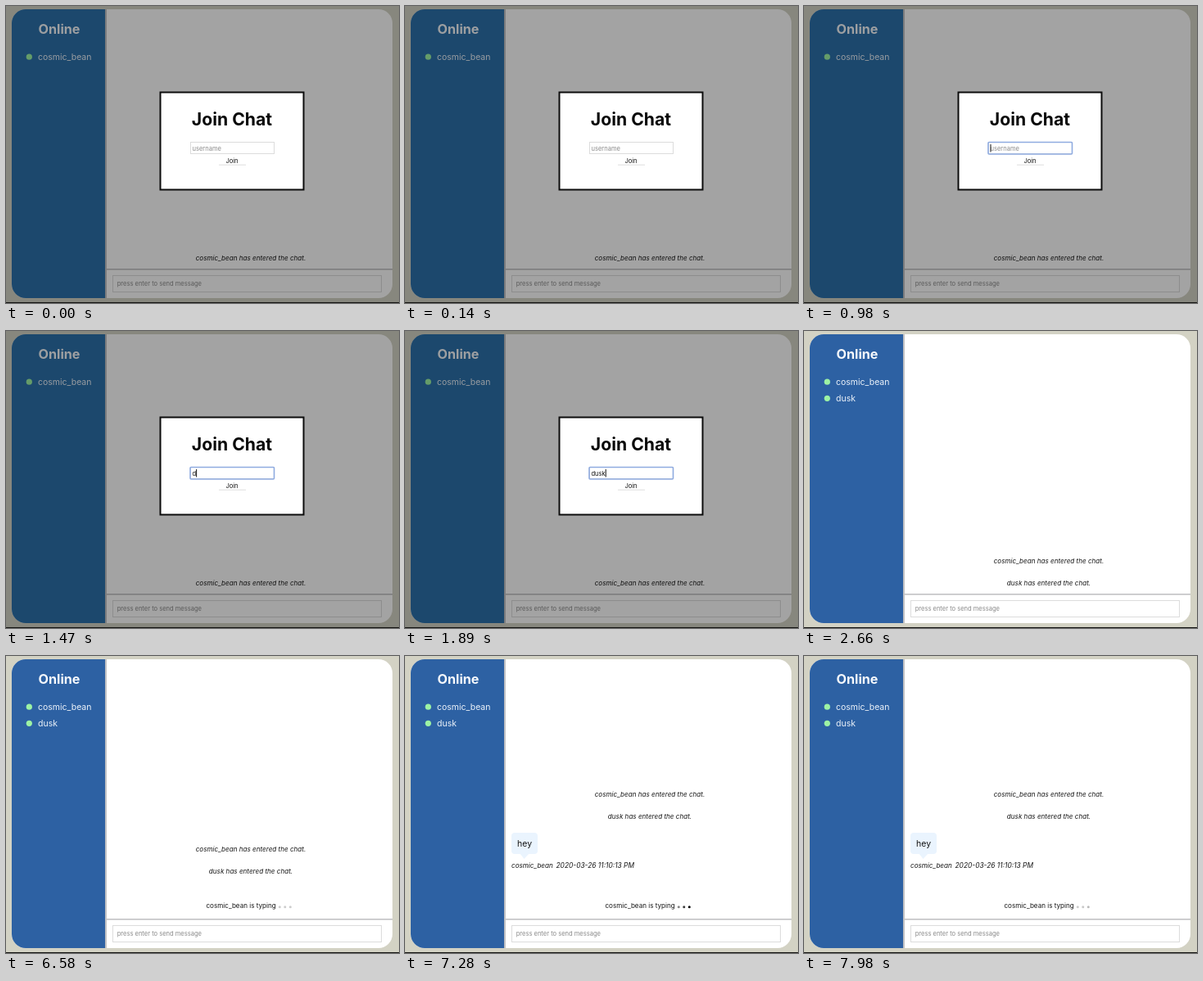
Animation of 480x363 px, one loop 8000 ms. Source, as an HTML page:

```html
<!DOCTYPE html>
<html lang="en">
<head>
<meta charset="utf-8">
<title>Chat</title>
<style>
  html, body { margin: 0; width: 100%; height: 100%; overflow: hidden; background: #d3d2c4; }
  svg { display: block; width: 480px; height: 363px; font-family: Inter, Roboto, "Open Sans", sans-serif; }
  .title { font-size: 16.2px; font-weight: 700; fill: #f5f8fc; }
  .user { font-size: 10.5px; fill: #edf3fa; }
  .note { font-size: 8.1px; fill: #161616; }
  .field { font-size: 7.55px; fill: #111; }
  .hint { fill: #8b8b8b; }
  .mid { text-anchor: middle; }
  .it { font-style: italic; }
  .box { fill: #fff; stroke: #dcdcdc; }
</style>
</head>
<body>
<svg viewBox="0 0 480 363">
  <rect width="480" height="363" fill="#d3d2c4"/>
  <rect x="7" y="4" width="465" height="353" rx="17" fill="#fff"/>
  <path id="side" d="M121 4H24A17 17 0 0 0 7 21V340A17 17 0 0 0 24 357H121Z"/>
  <rect x="121" y="4" width="2" height="353" fill="#c2c2c4"/>
  <rect x="123" y="321" width="349" height="1.6" fill="#c2c2c4"/>

  <text class="title mid" x="65" y="34">Online</text>
  <circle cx="28.3" cy="62.2" r="3.6" fill="#9df3a4"/>
  <text class="user" x="39" y="65.8" data-name="host"></text>
  <g id="guestRow">
    <circle cx="28.3" cy="82.3" r="3.6" fill="#9df3a4"/>
    <text class="user" x="39" y="85.9" data-name="guest"></text>
  </g>

  <text id="hostNote" class="note it mid" x="299"></text>
  <text id="guestNote" class="note it mid" x="299"></text>

  <g id="message">
    <path d="M140 241H152L145.500 248Z" fill="#eaf4fe"/>
    <rect x="130" y="216" width="32" height="26" rx="4" fill="#eaf4fe"/>
    <text x="137" y="233" font-size="10.5" fill="#161616">hey</text>
    <text class="note it" x="130" y="259" data-name="host"></text>
    <text class="note it" x="184.500" y="259" style="font-size:8.4px">2020-03-26 11:10:13 PM</text>
  </g>

  <g id="typing">
    <text id="typingText" class="note" x="244.500" y="308"></text>
    <circle class="dot" cx="334.300" cy="306.700" r="1.5"/>
    <circle class="dot" cx="340.800" cy="306.700" r="1.5"/>
    <circle class="dot" cx="347.300" cy="306.700" r="1.5"/>
  </g>

  <rect class="box" x="130.500" y="329.500" width="328" height="20"/>
  <text class="field hint" x="135.700" y="342.300">press enter to send message</text>

  <g id="modal">
    <rect width="480" height="363" fill="#000" opacity=".36"/>
    <rect x="188.500" y="105.500" width="175" height="119" fill="#fff" stroke="#0c0c0c" stroke-width="2"/>
    <text class="mid" x="276" y="146" font-size="21.2" font-weight="700" fill="#080808">Join Chat</text>
    <rect class="box" x="225.500" y="166.500" width="102" height="14"/>
    <rect id="focus" x="225" y="166.500" width="102.500" height="14.500" rx="1" fill="none" stroke="#8fabe0" stroke-width="1.6"/>
    <text id="hint" class="field hint" x="227.500" y="176.600">username</text>
    <text id="entry" class="field" x="227.500" y="176.600"></text>
    <rect id="caret" y="169" width="1" height="9.500" fill="#111"/>
    <rect x="260" y="193.700" width="33" height="1" fill="#dedede"/>
    <text class="field mid" x="276" y="191.700">Join</text>
  </g>
  <rect y="362" width="480" height="1" fill="#141412"/>
</svg>
<script>
const LOOP = 8000;
const names = { host: 'cosmic_bean', guest: 'dusk' };
const at = { focus: 980, joined: 2100, entered: 2240, typing: 6580, sent: 7210 };
const keys = [1470, 1540, 1820, 1890];
const $ = id => document.getElementById(id);
const show = (id, on) => $(id).setAttribute('display', on ? 'inline' : 'none');
const dots = document.querySelectorAll('.dot');

for (const el of document.querySelectorAll('[data-name]')) el.textContent = names[el.dataset.name];
$('hostNote').textContent = names.host + ' has entered the chat.';
$('guestNote').textContent = names.guest + ' has entered the chat.';
$('typingText').textContent = names.host + ' is typing';

// CSS "ease": cubic-bezier(.25, .1, .25, 1)
function ease(x) {
  const curve = (s, a, b) => 3 * s * (1 - s) ** 2 * a + 3 * s * s * (1 - s) * b + s ** 3;
  let lo = 0, hi = 1;
  for (let i = 0; i < 18; i++) {
    const mid = (lo + hi) / 2;
    if (curve(mid, .25, .25) < x) lo = mid; else hi = mid;
  }
  return curve(lo, .1, 1);
}

function blink(ms) {
  if (ms < 0) return .2;
  const p = ms % 1400 / 1400;
  return .2 + .8 * (p < .2 ? ease(p / .2) : 1 - ease((p - .2) / .8));
}

function draw(t) {
  const open = t < at.joined, entered = t >= at.entered;
  const typing = t >= at.typing, sent = t >= at.sent;

  $('side').setAttribute('fill', open ? '#2b70aa' : '#2d61a3');
  show('modal', open);
  show('guestRow', entered);
  show('guestNote', entered);
  show('typing', typing);
  show('message', sent);

  const base = 311 - (typing ? 45 : 0) - (sent ? 67.3 : 0);
  $('hostNote').setAttribute('y', base - (entered ? 26.7 : 0));
  $('guestNote').setAttribute('y', base);

  if (open) {
    const count = keys.filter(k => t >= k).length;
    $('entry').textContent = names.guest.slice(0, count);
    show('hint', !count);
    show('focus', t >= at.focus);
    show('caret', t >= at.focus);
    $('caret').setAttribute('x', 227.5 + (count ? $('entry').getComputedTextLength() : 0));
  }
  dots.forEach((dot, i) => dot.setAttribute('opacity', blink(t - at.typing - i * 200)));
}

const start = performance.now();
function tick() {
  draw((performance.now() - start) % LOOP);
  requestAnimationFrame(tick);
}
tick();
</script>
</body>
</html>
```
